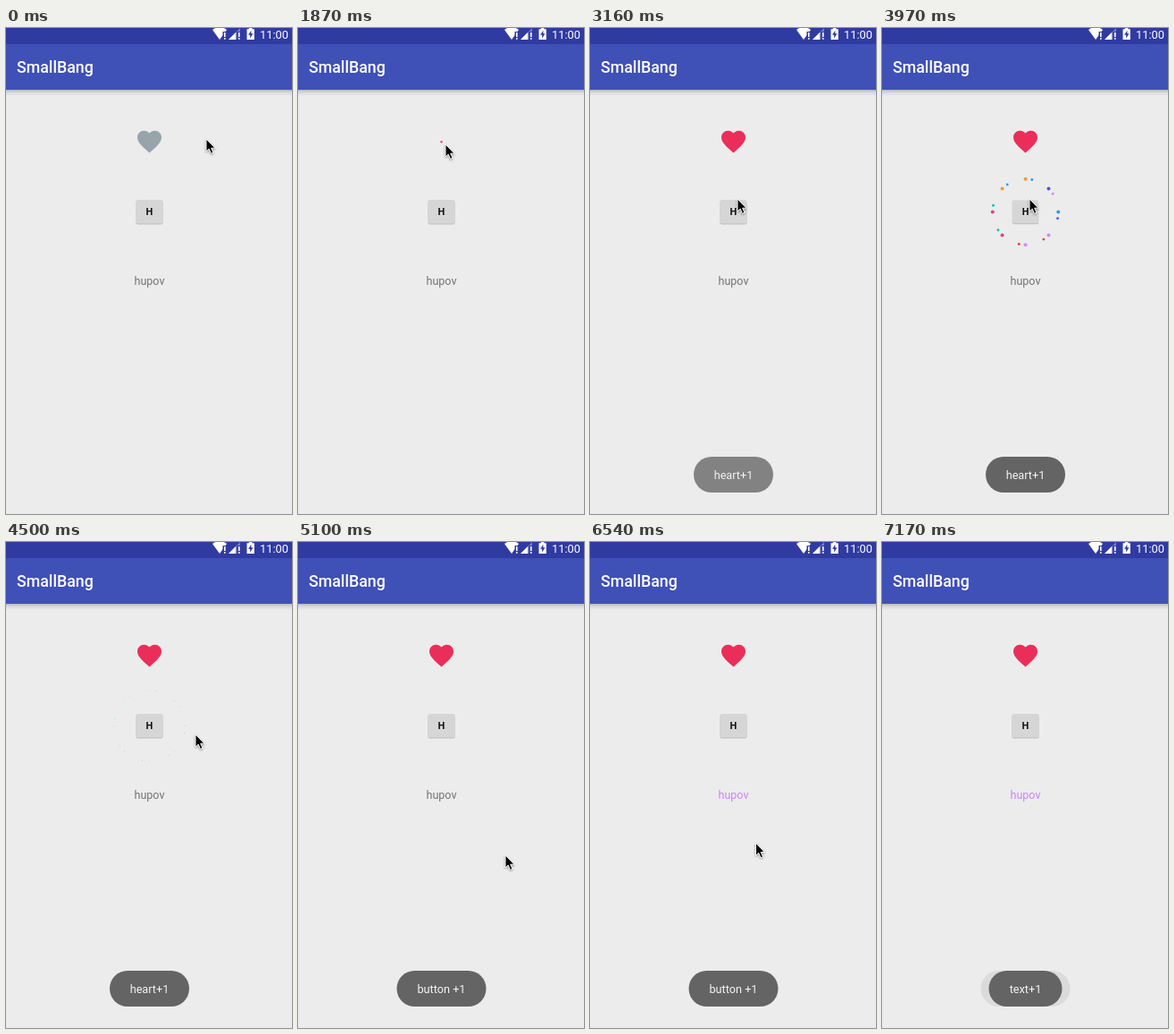
An HTML page that plays this animation: 320x543 px, repeating every 7.62 s.

```html
<!DOCTYPE html>
<html lang="en">
<head>
<meta charset="utf-8">
<title>SmallBang</title>
<style>
  html, body { margin: 0; width: 100%; height: 100%; overflow: hidden; background: #ececec; }
  svg { display: block; width: 100%; height: 100%; font-family: Roboto, "Open Sans", sans-serif; }
</style>
</head>
<body>
<svg viewBox="0 0 320 543">
  <defs>
    <linearGradient id="shade" x2="0" y2="1">
      <stop offset="0" stop-color="#b2b3bb"/>
      <stop offset=".4" stop-color="#d8d8da"/>
      <stop offset="1" stop-color="#ececec"/>
    </linearGradient>
  </defs>
  <rect width="320" height="543" fill="#ececec"/>
  <rect y="69" width="320" height="7" fill="url(#shade)"/>
  <rect width="320" height="69" fill="#3f50b7"/>
  <rect width="320" height="18" fill="#303ba1"/>

  <!-- status icons -->
  <g fill="#fff">
    <path d="M231 2Q239-4 247 2L239 13Z"/>
    <path d="M249 13L262 0V13Z" opacity=".35"/>
    <path d="M249 13L257 5V13Z"/>
    <path d="M242.5 4h5v10h-5zM258.5 4h4v10h-4z" fill="#303ba1"/>
    <path d="M244 5h1.6v5H244zm0 6h1.6v1.7H244zM260 5h1.6v5H260zm0 6h1.6v1.7H260z"/>
    <path d="M269.5 1.2h2.3V0h3.6v1.2h2.4V13h-8.3z"/>
    <path d="M274.4 2.7L271 7.7h2.1v3.8l3.4-5.2h-2.1z" fill="#303ba1"/>
    <text x="284" y="11.5" font-size="12.8">11:00</text>
    <text x="12" y="50" font-size="17.8" font-weight="500">SmallBang</text>
  </g>

  <g id="heart">
    <path transform="translate(0 .1) scale(1.35) translate(-12 -12.5)" d="M12 21.35l-1.45-1.32C5.4 15.36 2 12.28 2 8.5 2 5.42 4.42 3 7.5 3c1.74 0 3.41.81 4.5 2.09C13.09 3.81 14.76 3 16.5 3 19.58 3 22 5.42 22 8.5c0 3.78-3.4 6.86-8.55 11.54z"/>
  </g>
  <g id="button">
    <rect x="-15" y="-12.2" width="30" height="26.2" rx="2" fill="#bdbdbd"/>
    <rect x="-15" y="-13.5" width="30" height="26.5" rx="2" fill="#d6d6d6"/>
    <text y="3.7" font-size="11" font-weight="700" text-anchor="middle" fill="#111">H</text>
  </g>
  <g id="label">
    <text y="4.4" font-size="12.5" text-anchor="middle">hupov</text>
  </g>
  <g id="bangs"></g>
  <g id="toasts"></g>
  <path id="cursor" d="M0 0V14L3.2 11.1 5.5 16.4 8 15.3 5.7 10.2H10Z" stroke="#fff" style="filter:drop-shadow(0 1px 1px #0006)"/>
</svg>
<script>
const LOOP = 7620, HOLD = 7170, CX = 160.5;
const BANG = 680, BANG_DELAY = 60, BANG_CLEAR = 900;
const FILL_END = .15, DOTS_START = .28, RING_END = .3, POP_START = .27;
const PALETTE = ['#df4288', '#cd8bf8', '#2b9df2', '#0ac2ae', '#e8413c', '#5b4fe0', '#f09a3e'];

const $ = id => document.getElementById(id);
const clamp = v => Math.min(1, Math.max(0, v));
const mix = (a, b, k) => a + (b - a) * k;

function make(tag, parent, attrs) {
  const el = document.createElementNS('http://www.w3.org/2000/svg', tag);
  parent.append(el);
  return set(el, attrs);
}
function set(el, attrs) {
  for (const k in attrs) el.setAttribute(k, attrs[k]);
  return el;
}

const views = [
  { id: 'heart', y: 127.5, start: 1870, r: 27, off: '#97a5ab', on: '#ea2e59' },
  { id: 'button', y: 205.5, start: 3620, r: 36, off: '', on: '' },
  { id: 'label', y: 283, start: 5540, r: 14.8, off: '#737373', on: '#cb84f8' },
];
views.forEach((v, n) => {
  v.el = $(v.id);
  v.ring = make('circle', $('bangs'), { cx: CX, cy: v.y });
  v.dots = Array.from({ length: 16 }, (_, i) =>
    make('circle', $('bangs'), { fill: PALETTE[(i * 3 + n * 2 + (i >> 2)) % PALETTE.length] }));
});

const toasts = [
  { text: 'heart+1', w: 89, from: 2900, to: 4830 },
  { text: 'button +1', w: 100, from: 4600, to: 6700 },
  { text: 'text+1', w: 82, from: 6560, to: LOOP },
];
for (const t of toasts) {
  t.el = make('g', $('toasts'), {});
  make('rect', t.el, { x: CX - t.w / 2, y: 479, width: t.w, height: 40, rx: 20, fill: '#646464' });
  make('text', t.el, { x: CX, y: 503.7, 'font-size': 12.7, 'text-anchor': 'middle', fill: '#f4f4f4' })
    .textContent = t.text;
}

// time, x, y
const path = [
  [490, 224, 124], [940, 163.5, 132], [1090, 165, 130], [2700, 165, 130], [3120, 165, 191],
  [3980, 165, 191], [4340, 268, 224], [4500, 212, 215], [5090, 232, 350],
  [5450, 232, 350], [5590, 168, 297], [6370, 168, 297], [7050, 279, 546],
];

function cursorAt(t) {
  const i = path.findIndex(p => p[0] > t);
  if (i < 1) return (i ? path[path.length - 1] : path[0]).slice(1);
  const [a, b] = [path[i - 1], path[i]];
  const k = (t - a[0]) / (b[0] - a[0]), e = k * k * (3 - 2 * k);
  return [mix(a[1], b[1], e), mix(a[2], b[2], e)];
}

const overshoot = k => 1 + (k - 1) ** 2 * (3 * (k - 1) + 2);

function blend(k) {
  const c = [[223, 205], [66, 139], [136, 248]].map(([a, b]) => Math.round(mix(a, b, k)));
  return `rgb(${c})`;
}

function drawView(v, t) {
  const p = (t - v.start - BANG_DELAY) / BANG;
  const clicked = t >= v.start;
  const scale = clicked ? mix(.1, 1, overshoot(clamp((p - POP_START) / .5))) : 1;
  set(v.el, { transform: `translate(${CX} ${v.y}) scale(${scale})` });
  if (v.on) set(v.el, { fill: clicked ? v.on : v.off });

  // A disc grows, then hollows out into a thinning ring.
  const grow = clamp(p / FILL_END), hollow = clamp((p - FILL_END) / (RING_END - FILL_END));
  const width = v.r * (1 - hollow);
  set(v.ring, hollow > 0
    ? { r: v.r - width / 2, fill: 'none', stroke: blend(1), 'stroke-width': width }
    : { r: v.r * grow, fill: blend(grow), stroke: 'none' });

  const q = clamp((p - DOTS_START) / (1 - DOTS_START));
  const visible = p >= DOTS_START && t < v.start + BANG_CLEAR;
  const reach = v.r * (1 + q * .1);
  v.dots.forEach((dot, i) => {
    const small = i % 2, a = (i >> 1) * Math.PI / 4 + small * .2;
    const size = v.r * Math.max((small ? .05 : .07) * (1 - q), .01);
    set(dot, {
      cx: CX + reach * Math.cos(a),
      cy: v.y + reach * Math.sin(a),
      r: visible ? size : 0,
    });
  });
}

function draw(now) {
  const t = Math.min(now % LOOP, HOLD);
  views.forEach(v => drawView(v, t));
  for (const toast of toasts) {
    const enter = clamp((t - toast.from) / 500), leave = clamp((t - toast.to) / 500);
    set(toast.el, { opacity: (1 - (1 - enter) ** 2) * (1 - leave ** 2) });
  }
  set($('cursor'), { transform: `translate(${cursorAt(t)})` });
}

const begin = performance.now();
function tick() {
  draw(performance.now() - begin);
  requestAnimationFrame(tick);
}
tick();
</script>
</body>
</html>
```
